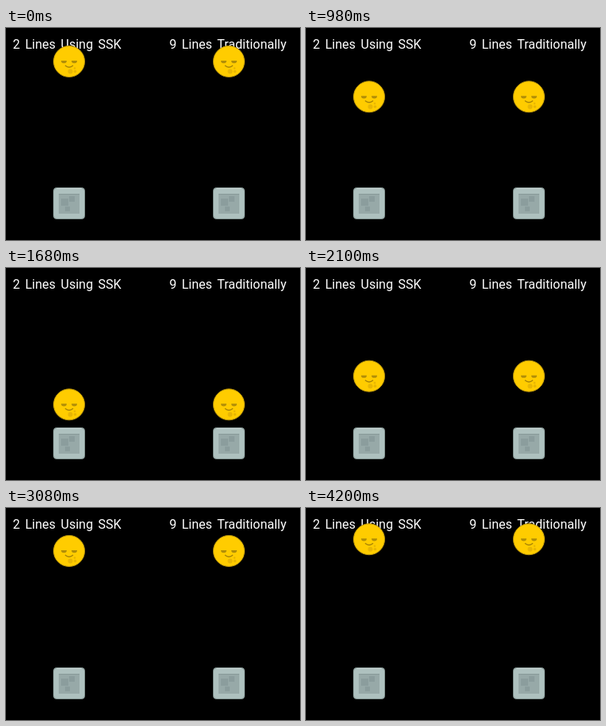
Animation of 368 by 266 pixels, one loop 4220 ms. Source, as an HTML page:

```html
<!DOCTYPE html>
<html lang="en">
<head>
<meta charset="utf-8">
<title>Bouncing moons</title>
<style>
  html, body { margin: 0; width: 100%; height: 100%; overflow: hidden; background: #000; }
  svg { display: block; }
  text { font: 16px Roboto, sans-serif; word-spacing: 2.5px; fill: #fff; }
</style>
</head>
<body>
<svg width="368" height="266" viewBox="0 0 368 266">
  <defs>
    <g id="moon">
      <circle r="19.5" fill="#fc0" stroke="#b8930a"/>
      <g fill="#e8b603">
        <circle cx="1.5" cy="12.5" r="3"/>
        <circle cx="7.5" cy="12.5" r="1.8"/>
        <circle cx="7" cy="8.5" r="1.3"/>
      </g>
      <path d="M-10-1h7a3.5 3.2 0 0 1-7 0zM3-1h7a3.5 3.2 0 0 1-7 0z" fill="#b18e08"/>
      <path d="M-5 5q5 4.5 10 0" fill="none" stroke="#a88506" stroke-width="1.4"/>
    </g>
    <g id="block">
      <rect x="-19.5" y="-19.5" width="39" height="39" rx="3.8" fill="#aec1bf" stroke="#819290"/>
      <path d="M-15.5-18.5h31" stroke="#c9d5d4"/>
      <rect x="-13" y="-12" width="26" height="25" fill="#97a9a8"/>
      <path d="M-13-11.5h26" stroke="#889a99"/>
      <path d="M-10-6h9v9h-9zM0-9h7v7h-7zM-5 4h6v6h-6z" fill="#8b9d9d"/>
    </g>
  </defs>
  <text x="8.5" y="26">2 Lines Using SSK</text>
  <text x="204.5" y="26">9 Lines Traditionally</text>
  <use href="#block" x="79" y="220"/>
  <use href="#block" x="279" y="220"/>
  <g id="moons">
    <use href="#moon" x="79"/>
    <use href="#moon" x="279"/>
  </g>
</svg>
<script>
  const LOOP = 4220, STEP = 140, IMPACT = 12.5;
  const moons = document.getElementById('moons');

  // Accelerating drop, then a ballistic rebound that peaks and starts to fall again.
  const fall = n => 42 + 4.5 * n + 0.678 * n * (n - 4) + 0.0355 * n * (n - 4) * (n - 9);
  const rebound = n => 34.8 + 0.656 * (n - 27.4) ** 2;

  function draw() {
    const n = Math.floor(performance.now() % LOOP / STEP);
    const y = n < IMPACT ? fall(n) : rebound(n);
    moons.setAttribute('transform', `translate(0 ${y.toFixed(2)})`);
    requestAnimationFrame(draw);
  }
  draw();
</script>
</body>
</html>
```
